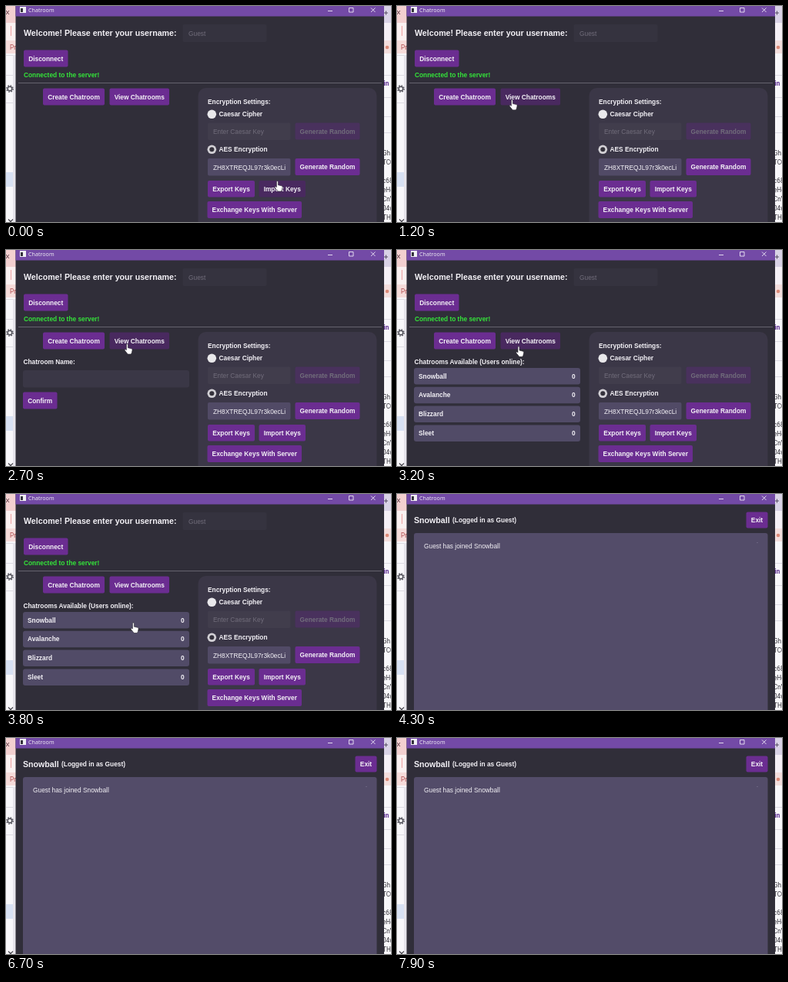
Animation of 500x282 px, one loop 8000 ms. Source, as an HTML page:

```html
<!DOCTYPE html>
<html lang="en">
<head>
<meta charset="utf-8">
<title>Chatroom</title>
<style>
  html, body { margin: 0; width: 100%; height: 100%; overflow: hidden; background: #f8f7fa; }
  svg { display: block; width: 500px; height: 282px; }
  text { font: 8.36px "Liberation Sans", Arial, sans-serif; fill: #f3f1f6; white-space: pre; }
  .b { font-weight: bold; }
  .big { font-weight: bold; font-size: 10.65px; }
  .ui { font: 7.2px "Open Sans", sans-serif; }
  .page { font: 8.2px Roboto, sans-serif; fill: #37353d; }
  .mid { text-anchor: middle; }
  .dim { fill: #716d7b; }
  .btn { fill: #6b2d91; }
  .btn.over { fill: #49295f; }
  .off { fill: #49315d; }
</style>
</head>
<body>
<svg id="stage" viewBox="0 0 500 282"></svg>
<script>
const USER = 'Guest';
const stage = document.getElementById('stage');

const rect = (x, y, w, h, fill, r = 0, cls = '') =>
  `<rect x="${x}" y="${y}" width="${w}" height="${h}" rx="${r}" fill="${fill}" class="${cls}"/>`;
const text = (x, y, s, cls = 'b', extra = '') => `<text x="${x}" y="${y}" class="${cls}" ${extra}>${s}</text>`;
const line = (d, color, w = 1) => `<path d="${d}" fill="none" stroke="${color}" stroke-width="${w}"/>`;
const button = (x, y, w, h, s, off) =>
  rect(x, y, w, h, '', 2, off ? 'off' : 'btn') +
  text(x + w / 2, y + h / 2 + 3, s, off ? 'b mid dim' : 'b mid');
const radio = (y, s, on) =>
  `<circle cx="267.3" cy="${y}" r="5.8" fill="${on ? '#d2d0d5' : '#e9e8eb'}"/>` +
  (on ? `<circle cx="267.3" cy="${y}" r="3" fill="#35323c"/>` : '') + text(276.5, y + 3, s);

// Browser page visible on both sides of the window
const pageText = [['Gh', 195], ['TCO', 207], ['c68', 231], ['eHd', 243], ['CnV', 255], ['04w', 267], ['TH', 279]];
const backdrop =
  rect(0, 0, 14, 22, '#f3d0d0') + rect(0, 22, 14, 23, '#fbf1f1') + rect(0, 45, 14, 17, '#f6dcda') +
  rect(490, 0, 10, 22, '#d9d2e6') + rect(490, 22, 10, 23, '#f5f0f6') + rect(490, 45, 10, 17, '#f3dedd') +
  line('M0 6l4 5M4 6l-4 5', '#6b4650') + line('M491 9h5M493.5 6.5v5', '#554c63') +
  line('M6.5 26v13', '#efaaa9', 1.2) +
  text(5, 57, 'Pr', 'page', 'style="fill:#b14d50"') +
  `<circle cx="495" cy="54" r="2.3" fill="#dc8a78"/>` +
  line('M0 64.5h13M0 90.5h13M0 126.5h13M491 90.5h9M491 119.5h9M491 144.5h9M491 165.5h9', '#dcdae2') +
  rect(0, 217, 14, 19, '#d8e1f3') + rect(9, 64, 4, 218, '#e6e4eb') +
  `<circle cx="5" cy="108" r="2.8" fill="none" stroke="#4f4e57" stroke-width="1.4"/>
   <circle cx="5" cy="108" r="4.2" fill="none" stroke="#4f4e57" stroke-width="1.3" stroke-dasharray="1.7 1.6"/>` +
  line('M3 278.5l3 3 3-3', '#45434c', 1.2) +
  text(490.5, 103.5, 'in', 'page', 'style="fill:#5c2d91;font-weight:bold"') +
  pageText.map(([s, y]) => text(489, y, s, 'page')).join('');

const frame =
  rect(12.5, 0, 478.5, 282, '#302e39') + rect(12.5, 0, 478.5, 13.5, '#734aa6') +
  rect(18, 1, 8, 8, '#f1eff4') + rect(19, 3, 3, 5, '#34323c') +
  text(29, 8, 'Chatroom', 'ui') +
  line('M418 6.5h6M445.5 2.5h5.5v5.5h-5.5zM474 2.5l5.5 5.5M479.5 2.5l-5.5 5.5', '#eee8f6', .9);

const settings =
  rect(249.5, 107, 232, 190, '#3b3747', 10) +
  text(262, 127.5, 'Encryption Settings:') +
  radio(141.3, 'Caesar Cipher') +
  rect(262, 152.5, 107.5, 22.5, '#413d4c', 2) + text(269, 167, 'Enter Caesar Key', 'dim') +
  button(375.5, 152.5, 84, 22, 'Generate Random', true) +
  radio(187.3, 'AES Encryption', true) +
  rect(262, 199, 107.5, 22.5, '#514a66', 2) + text(269, 213.5, 'ZH8XTREQJL97r3k0ecLi', '') +
  button(375.5, 199, 84, 22, 'Generate Random') +
  button(262, 228, 61, 21.5, 'Export Keys') +
  button(328.5, 228, 60.5, 21.5, 'Import Keys') +
  button(261.5, 255, 122.5, 22, 'Exchange Keys With Server');

const lobby =
  text(23, 39.3, 'Welcome! Please enter your username:', 'big') +
  rect(229.5, 24, 109, 23, '#35333f', 2) + text(237, 38.7, USER, 'dim') +
  button(23, 57.5, 57.5, 22, 'Disconnect') +
  text(23, 93, 'Connected to the server!', 'b', 'style="fill:#34e43a"') +
  line('M16 100.5h472', '#66636f') +
  button(48, 107.5, 80, 22, 'Create Chatroom') +
  button(134.5, 107.5, 77.5, 22, 'View Chatrooms') + settings;

const form =
  text(22.5, 149, 'Chatroom Name:') + rect(22, 157, 216, 22.5, '#3a3746', 3) +
  button(22, 185.5, 44.5, 22, 'Confirm');

const rooms = text(22.5, 149, 'Chatrooms Available (Users online):') +
  ['Snowball', 'Avalanche', 'Blizzard', 'Sleet'].map((name, i) => {
    const y = 154 + i * 24.8;
    return rect(22, y, 216, 21.5, '#514b67', 3, 'room') + text(28, y + 13.6, name) + text(227, y + 13.6, '0');
  }).join('');

const chat =
  text(22, 37.7, 'Snowball', 'big') + text(72, 37, `(Logged in as ${USER})`) +
  button(453.5, 23.5, 28, 21, 'Exit') +
  rect(22, 51, 459.5, 240, '#534c69', 3) +
  text(35, 71, `${USER} has joined Snowball`, '') + rect(467, 63, 2, 1, '#6a627f');

const hand = `<path id="hand" d="M2.4 1.2c0-1.6 2-1.6 2 0v4l4.4 1.1c1.1.4 1.4 1.1 1.2 2.2l-.7 3.2-1 1.8H4.2
  L.4 8.7c-.8-1.2.6-2 1.4-1.2l.6.6z" fill="#fff" stroke="#24222b" stroke-width=".6"/>`;
const arrow = `<path id="arrow" d="M2 0v11l2.6-2.3 1.7 3.7 1.7-.8-1.7-3.5h3.5z" fill="#fff" stroke="#24222b" stroke-width=".6"/>`;

const group = (id, body) => `<g id="${id}">${body}</g>`;
stage.innerHTML = backdrop + frame + group('lobby', lobby) + group('form', form) +
  group('rooms', rooms) + group('chat', chat) + group('cursor', hand + arrow);

const $ = id => document.getElementById(id);
const show = (id, on) => $(id).style.display = on ? '' : 'none';
const targets = [...document.querySelectorAll('.btn, .room')];

// Cursor stops: time, x, y
const path = [
  [0, 349, 228.5], [200, 349, 228.5], [1000, 158, 122], [1200, 146, 122.3], [1600, 98, 120],
  [2200, 98, 120], [2700, 154, 122.5], [3100, 154, 122.5], [3700, 162, 168], [8000, 162, 168]
];

function cursorAt(t) {
  const i = path.findIndex(p => p[0] > t);
  const [t0, x0, y0] = path[i - 1], [t1, x1, y1] = path[i];
  const u = (t - t0) / (t1 - t0), k = u * u * (3 - 2 * u);
  return [x0 + (x1 - x0) * k, y0 + (y1 - y0) * k];
}

function contains(el, x, y) {
  const { x: l, y: t, width: w, height: h } = el.getBBox();
  return w > 0 && x >= l && x <= l + w && y >= t && y <= t + h;
}

function draw(now) {
  const t = Math.floor(now % 8000 / 100) * 100;
  const [x, y] = cursorAt(t);
  const inChat = t >= 4100;
  show('lobby', !inChat);
  show('form', t >= 1900 && t < 3000);
  show('rooms', t >= 3000 && !inChat);
  show('chat', inChat);
  show('cursor', !inChat);

  let clickable = false;
  for (const el of targets) {
    const visible = el.parentNode.style.display !== 'none';
    const over = visible && !inChat && contains(el, x + 3, y + 1);
    el.classList.toggle('over', over);
    clickable ||= over;
  }
  show('hand', clickable);
  show('arrow', !clickable);
  $('cursor').setAttribute('transform', `translate(${x} ${y})`);
  requestAnimationFrame(draw);
}
requestAnimationFrame(draw);
</script>
</body>
</html>
```
